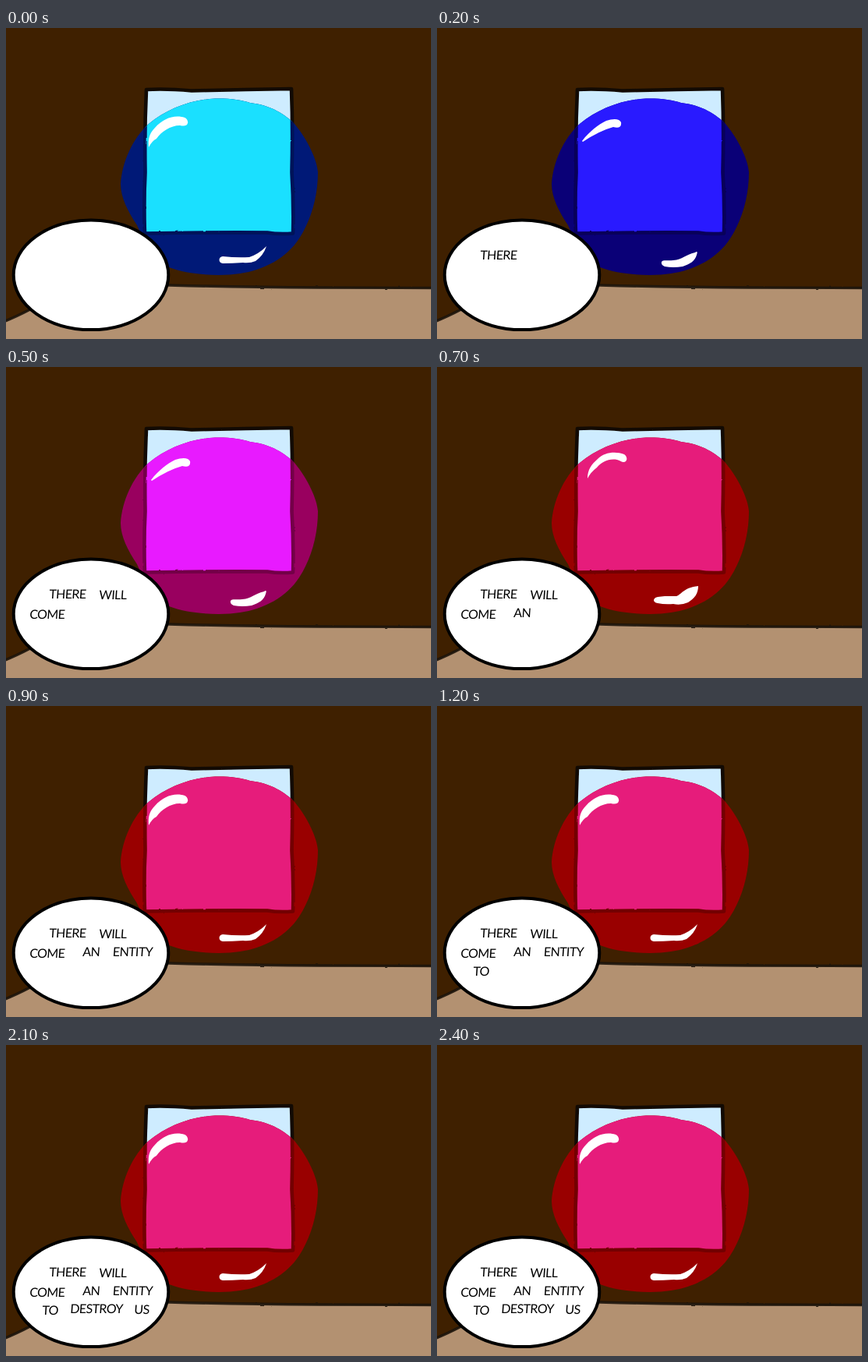
An HTML page that plays this animation: 545x399 px, repeating every 2.5 s.

```html
<!DOCTYPE html>
<html lang="en">
<head>
<meta charset="utf-8">
<title>There will come an entity</title>
<style>
  html, body { margin: 0; width: 100%; height: 100%; overflow: hidden; background: #3f2000; }
  svg { display: block; width: 545px; height: 399px; }
  text { font: 16px Lato, "Open Sans", sans-serif; letter-spacing: -.6px; fill: #000; }
  .ink { fill: none; stroke: #120a03; stroke-width: 4.6; stroke-linejoin: round; filter: url(#rough); }
  .floor { stroke: #1c140c; stroke-width: 3.4; stroke-opacity: .9; }
</style>
</head>
<body>
<svg viewBox="0 0 545 399">
  <defs>
    <filter id="rough" filterUnits="userSpaceOnUse" x="-10" y="0" width="565" height="399" color-interpolation-filters="sRGB">
      <feTurbulence type="fractalNoise" baseFrequency=".12" numOctaves="2" seed="4"/>
      <feDisplacementMap in="SourceGraphic" scale="2" xChannelSelector="R" yChannelSelector="G"/>
      <feGaussianBlur stdDeviation=".5"/>
    </filter>
    <path id="pane" d="M180 79Q205 77.5 238 80.5Q300 79 366 78Q368 130 366.5 185Q369 225 368 263.5Q350 265 335 262.5Q260 262 178 263.5Q176.5 225 178.5 185Q177.5 130 180 79Z"/>
    <path id="ball" d="M147 200C149 172 162 142 183 123C206 104 237 92 268 90.5C285 90 302 92 313 96C340 99 358 111 370 123C388 145 399 170 400 185C400 215 392 245 376 270C360 295 330 311 300 315C275 319 235 317 209 307C192 297 176 272 168 253C156 235 147 217 147 200Z"/>
    <clipPath id="inBall"><use href="#ball"/></clipPath>
  </defs>

  <rect width="545" height="399" fill="#3f2000"/>
  <path d="M0 376L32 361L105 328L209 330L400 333.5L545 334V399H0Z" fill="#b39171"/>
  <path class="ink floor" d="M-6 378Q12 371 32 360.5L105 328M105 329L209 330Q300 332.5 400 333T552 333.5"/>

  <use href="#pane" fill="#ceecff"/>
  <use href="#pane" class="ink"/>

  <use href="#ball" id="rim"/>
  <g clip-path="url(#inBall)">
    <use href="#pane" id="core"/>
    <g filter="url(#rough)" fill="none" stroke-width="4.6" stroke-linejoin="round">
      <use href="#pane" id="edge"/>
      <use href="#pane" stroke="#000" stroke-opacity=".25"/>
    </g>
  </g>
  <path id="shine" fill="#fff"/>

  <ellipse cx="109" cy="316.8" rx="99.3" ry="70.3" fill="#fff" stroke="#000" stroke-width="4"/>
  <g id="speech"></g>
</svg>
<script>
  const STEP = 100, STEPS = 25;

  // Ball colour over the window and over the wall, one pair per step
  const tints = [
    ["#1ae0ff", "#001977"], ["#1a7dff", "#000d77"], ["#291aff", "#0a0077"],
    ["#681aff", "#380074"], ["#a81aff", "#69006a"], ["#e81aff", "#99005f"],
    ["#e61ab4", "#990000"], ["#e61c7b", "#990000"]
  ];

  const shines = [
    "M183 153C182 142 184 135 191 128C201 117 213 112 225 114C231 114 234 119 233 122C232 126 228 126 223 125C211 125 199 133 193 142Q187 145 183 153Z" +
    "M278 293Q296 295 312 294Q324 290 334 280Q330 292 320 299Q313 302 304 301Q290 302 278 302C272 302 272 293 278 293Z",
    "M193 143C193 132 198 125 206 118C215 109 229 108 240 112C244 115 244 119 242 121C239 124 235 120 231 119C220 117 211 122 205 129Q197 135 193 143Z" +
    "M278 299C279 294 286 295 292 294Q301 294 307 294C315 291 316 283 335 281C335 291 330 297 322 302Q313 306 303 304Q292 305 283 303Q278 302 278 299Z",
    "M186 145C196 132 207 124 217 119C226 116 234 116 236 121C237 127 233 129 226 127Q208 132 187 146Z" +
    "M288 300C290 297 295 299 303 298C315 297 318 291 331 288Q335 285 333 291C331 299 324 303 315 306Q303 308 292 306Q287 304 288 300Z"
  ];

  const words = [
    ["THERE", 55, 296.5], ["WILL", 119, 298], ["COME", 30, 322.5], ["AN", 98, 321],
    ["ENTITY", 136.5, 320.5], ["TO", 46, 346], ["DESTROY", 82, 344], ["US", 164, 344.5]
  ];

  const el = id => document.getElementById(id);
  const [rim, core, edge, shine, speech] = ["rim", "core", "edge", "shine", "speech"].map(el);

  const labels = words.map(([word, x, y]) => {
    const label = document.createElementNS("http://www.w3.org/2000/svg", "text");
    label.textContent = word;
    label.setAttribute("transform", `translate(${x} ${y}) skewX(-4)`);
    return speech.appendChild(label);
  });

  function draw(step) {
    const [inner, outer] = tints[Math.min(step, tints.length - 1)];
    rim.setAttribute("fill", outer);
    core.setAttribute("fill", inner);
    edge.setAttribute("stroke", outer);
    shine.setAttribute("d", shines[step % shines.length]);
    // A new word every second step
    labels.forEach((label, i) =>
      label.setAttribute("visibility", step >= 2 * i + 1 ? "visible" : "hidden"));
  }

  const start = performance.now();
  let shown = 0;
  draw(0);

  function tick() {
    const step = Math.floor((performance.now() - start) / STEP) % STEPS;
    if (step !== shown) draw(shown = step);
    requestAnimationFrame(tick);
  }
  requestAnimationFrame(tick);
</script>
</body>
</html>
```
